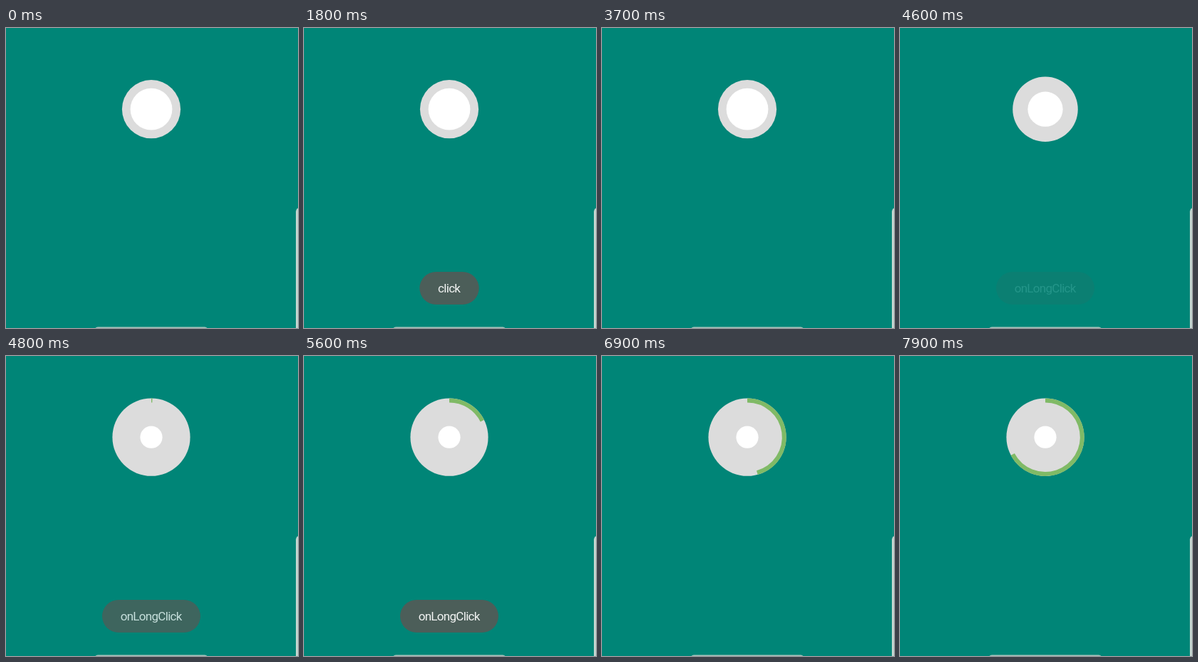
Recreate the animation shown at these times as an HTML page. Size 410 by 422 pixels, loop 8 s.

```html
<!DOCTYPE html>
<html lang="en">
<head>
<meta charset="utf-8">
<title>Record button</title>
<style>
  html, body { margin: 0; width: 100%; height: 100%; overflow: hidden; background: #008577; }
  svg { display: block; width: 100%; height: 100%; }
  .toast rect { fill: #4c5e59; }
  .toast text {
    font: 400 17px Roboto, Arial, sans-serif;
    letter-spacing: -0.7px;
    text-anchor: middle;
    fill: #f2f4f3;
  }
</style>
</head>
<body>
<svg viewBox="0 0 410 422">
  <rect width="410" height="422" fill="#008577"/>
  <rect x="407" y="252.5" width="20" height="200" rx="6" fill="#c3d5d0"/>
  <rect x="125" y="420.4" width="158" height="20" rx="4" fill="#a9c3bc"/>
  <circle id="outer" cx="204" cy="114.2" fill="#dcdcdc"/>
  <path id="arc" fill="none" stroke="#80ba66" stroke-width="6"/>
  <circle id="inner" cx="204" cy="114.2" fill="#fff"/>
  <g class="toast" id="click">
    <rect x="162.3" y="343" width="83.4" height="46" rx="23"/>
    <text x="203.7" y="372">click</text>
  </g>
  <g class="toast" id="long">
    <rect x="135" y="343" width="138" height="46" rx="23"/>
    <text x="203.7" y="372">onLongClick</text>
  </g>
</svg>
<script>
const LOOP = 8000, STEP = 100;
const CX = 204, CY = 114.2, ARC_R = 51.8;
const GROW = { start: 4480, time: 300 };
const SWEEP = { start: 4780, degPerMs: 0.0776 };
const TOASTS = [
  { id: 'click', show: 1380, hide: 3280 },
  { id: 'long', show: 4570, hide: 6460 }
];
const FADE = 400;

const $ = id => document.getElementById(id);
const ramp = (t, start, time) => Math.min(1, Math.max(0, (t - start) / time));
const mix = (a, b, p) => a + (b - a) * p;
const easeInOut = x => (1 - Math.cos(Math.PI * x)) / 2;

function toastAlpha(t, { show, hide }) {
  const fadeIn = 1 - (1 - ramp(t, show, FADE)) ** 2;
  const fadeOut = ramp(t, hide, FADE) ** 2;
  return fadeIn * (1 - fadeOut);
}

function arcPath(deg) {
  if (deg <= 0) return '';
  const a = deg * Math.PI / 180;
  const x = CX + ARC_R * Math.sin(a);
  const y = CY - ARC_R * Math.cos(a);
  return `M${CX} ${CY - ARC_R}A${ARC_R} ${ARC_R} 0 ${deg > 180 ? 1 : 0} 1 ${x} ${y}`;
}

function draw(t) {
  const p = easeInOut(ramp(t, GROW.start, GROW.time));
  $('outer').setAttribute('r', mix(41.1, 54.6, p));
  $('inner').setAttribute('r', mix(29.4, 15.6, p));
  $('arc').setAttribute('d', arcPath((t - SWEEP.start) * SWEEP.degPerMs));
  for (const toast of TOASTS) $(toast.id).setAttribute('opacity', toastAlpha(t, toast));
}

const origin = performance.now();
function tick() {
  const t = (performance.now() - origin) % LOOP;
  draw(Math.floor(t / STEP) * STEP);
  requestAnimationFrame(tick);
}
draw(0);
requestAnimationFrame(tick);
</script>
</body>
</html>
```
